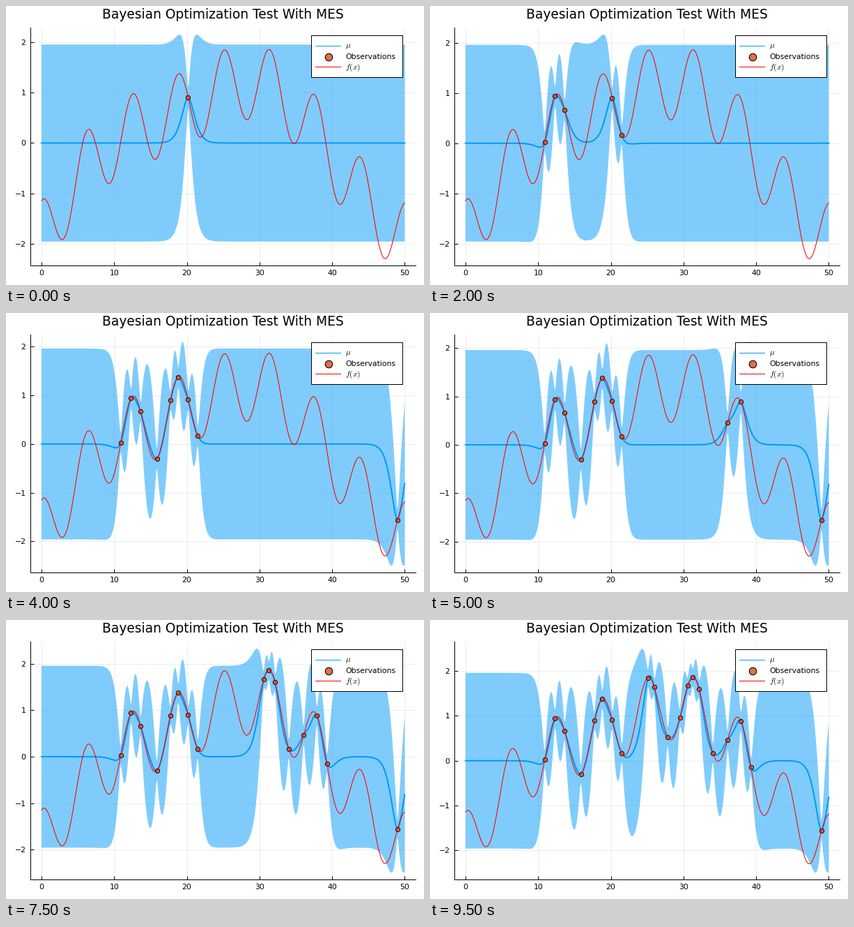
Animation of 600x400 px, one loop 10 s. Source, as a matplotlib script:

```python
import numpy as np
import matplotlib.pyplot as plt
from matplotlib.animation import FuncAnimation
from matplotlib.patches import Rectangle

plt.rcParams["font.family"] = "DejaVu Sans"
plt.rcParams["mathtext.fontset"] = "cm"

W, H, DPI = 600, 400, 100
LEFT, RIGHT, TOP, BOTTOM = 35.4, 588.0, 31.4, 371.9
BLUE, ORANGE, RED = "#009AFA", "#E36F47", "#FF0000"
NOISE = 0.01

# Sample locations in the order the optimizer visits them
SAMPLES = np.array([20.18, 21.51, 12.32, 13.63, 10.90, 18.83, 17.75,
                    15.87, 49.01, 36.08, 37.90, 39.30, 34.05, 31.30,
                    30.59, 32.15, 29.51, 27.83, 25.12, 25.97])
GRID = np.linspace(0, 50, 501)


def px(size):
    """Pixels to points."""
    return size * 72 / DPI


def objective(x):
    return (3 * np.sin(np.pi * x / 50) + 0.25 * np.sin(x / 4)
            + 0.75 * np.cos(x) - 1.9)


def matern52(a, b):
    r = np.sqrt(5) * np.abs(a[:, None] - b[None, :])
    return (1 + r + r**2 / 3) * np.exp(-r)


def posterior(x_obs):
    """Mean and 95% half width of the Gaussian process on the grid."""
    gram = matern52(x_obs, x_obs) + NOISE * np.eye(len(x_obs))
    cross = matern52(x_obs, GRID)
    weights = np.linalg.solve(gram, cross)
    mean = weights.T @ objective(x_obs)
    var = 1 - np.sum(cross * weights, axis=0)
    return mean, 1.96 * np.sqrt(np.maximum(var, 0))


fig = plt.figure(figsize=(W / DPI, H / DPI), dpi=DPI, facecolor="white")
ax = fig.add_axes([LEFT / W, 1 - BOTTOM / H,
                   (RIGHT - LEFT) / W, (BOTTOM - TOP) / H])
ax.set_xlim(-1.5, 51.5)
ax.set_xticks(range(0, 51, 10))
ax.set_yticks(range(-2, 3))
ax.set_axisbelow(True)
ax.grid(color="black", alpha=0.1, linewidth=px(0.7))
ax.tick_params(direction="in", length=px(5), width=px(1),
               labelsize=px(10.9))
ax.tick_params(axis="x", pad=px(6))
ax.tick_params(axis="y", pad=px(7))
for side in ("top", "right"):
    ax.spines[side].set_visible(False)
for side in ("left", "bottom"):
    ax.spines[side].set_linewidth(px(1))

truth = objective(GRID)
band, = ax.fill([0, 1, 1], [0, 0, 1], color=BLUE, alpha=0.5, linewidth=0,
                zorder=2)
mean_line, = ax.plot([], [], color=BLUE, linewidth=px(2), snap=False,
                     zorder=3)
dots, = ax.plot([], [], "o", color=ORANGE, markersize=px(6.2), snap=False,
                markeredgecolor="black", markeredgewidth=px(1), zorder=4)
ax.plot(GRID, truth, color=RED, linewidth=px(1.05), zorder=5)

# Title and legend are placed in pixel coordinates
overlay = fig.add_axes([0, 0, 1, 1])
overlay.set_xlim(0, W)
overlay.set_ylim(H, 0)
overlay.axis("off")
overlay.text(311.5, 18, "Bayesian Optimization Test With MES",
             fontsize=px(18.67), ha="center", va="baseline")
overlay.add_patch(Rectangle((438.5, 42.5), 131, 60, facecolor="white",
                            edgecolor="black", linewidth=px(1), snap=False))
for y, color in ((57.5, BLUE), (87.5, RED)):
    overlay.plot([444, 481], [y, y], color=color, linewidth=px(1),
                 solid_capstyle="butt", snap=False)
overlay.plot(462.7, 72.5, "o", color=ORANGE, markersize=px(10.5), snap=False,
             markeredgecolor="black", markeredgewidth=px(1.1))
for y, label, size in ((59.5, r"$\mu$", 11.5), (76.5, "Observations", 10.9),
                       (90.5, r"$f(x)$", 11.5)):
    overlay.text(487, y, label, fontsize=px(size), va="baseline")


def update(frame):
    x_obs = SAMPLES[:frame + 1]
    mean, half = posterior(x_obs)
    low, high = mean - half, mean + half
    band.set_xy(np.column_stack([np.r_[GRID, GRID[::-1]],
                                 np.r_[high, low[::-1]]]))
    mean_line.set_data(GRID, mean)
    dots.set_data(x_obs, objective(x_obs))
    bottom = min(low.min(), truth.min())
    top = max(high.max(), truth.max())
    pad = 0.03 * (top - bottom)
    ax.set_ylim(bottom - pad, top + pad)
    return band, mean_line, dots


anim = FuncAnimation(fig, update, frames=len(SAMPLES), interval=500,
                     init_func=lambda: update(0), repeat=True,
                     repeat_delay=0, blit=False)
plt.show()
```
